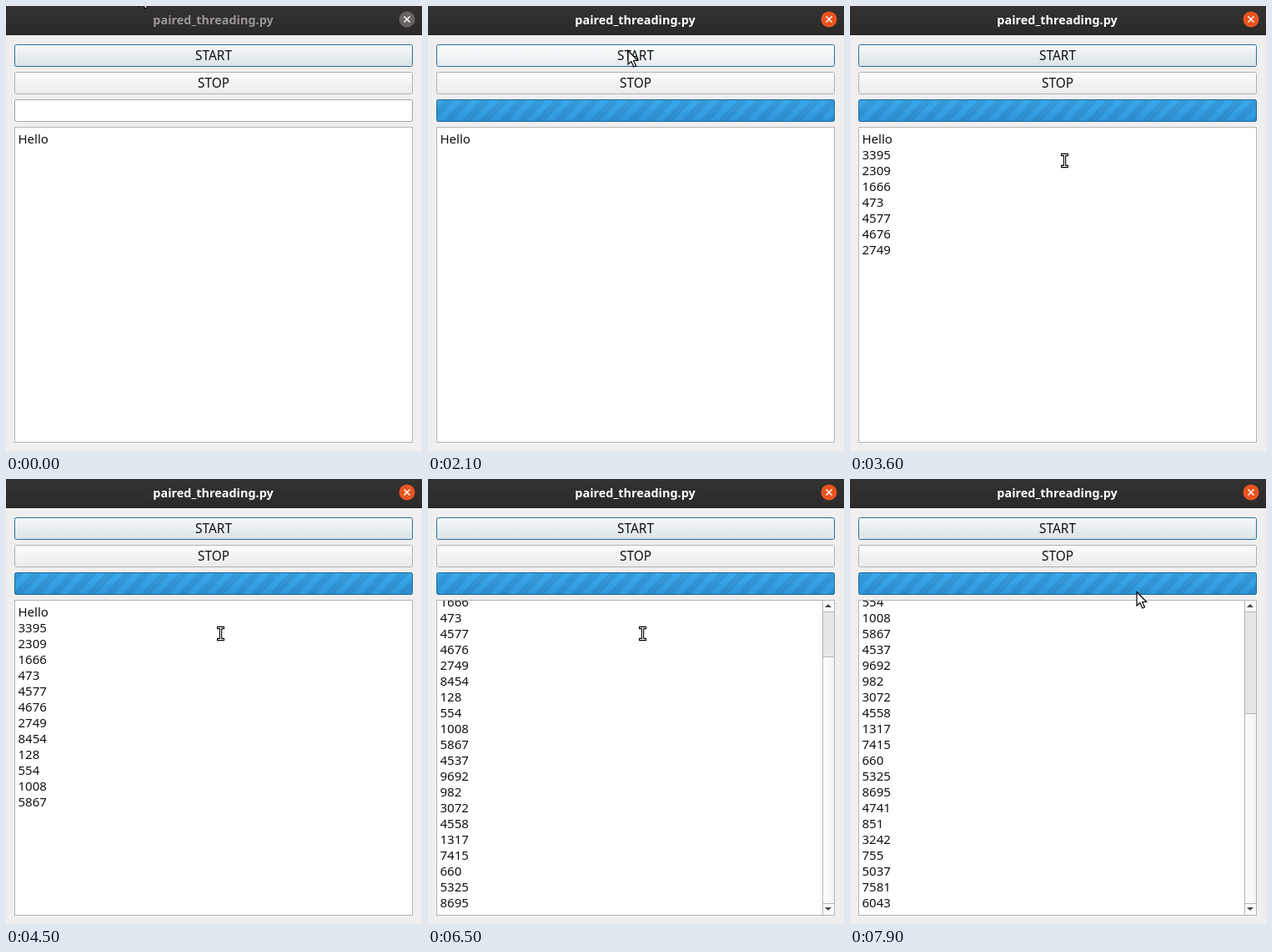
An HTML page for the animation above (8000 ms loop, 499 px wide and 534 px high).

```html
<!DOCTYPE html>
<html lang="en">
<head>
<meta charset="utf-8">
<style>
  html, body { margin: 0; width: 100%; height: 100%; overflow: hidden; background: #efefef; }
  svg { display: block; }
  text { font-family: "Noto Sans", "Open Sans", sans-serif; font-size: 15px; fill: #111; }
  .label { font-size: 15.4px; text-anchor: middle; }
  #title { font-size: 14.4px; font-weight: bold; text-anchor: middle; }
  .out { fill: none; stroke: #b4b4b4; }
</style>
</head>
<body>
<svg width="499" height="534" viewBox="0 0 499 534">
  <defs>
    <linearGradient id="bar" x2="0" y2="1"><stop stop-color="#353331"/><stop offset="1" stop-color="#2b2929"/></linearGradient>
    <linearGradient id="focus" x2="0" y2="1"><stop stop-color="#f5f9fa"/><stop offset="1" stop-color="#dae3e8"/></linearGradient>
    <linearGradient id="focusHover" x2="0" y2="1"><stop stop-color="#fdfefe"/><stop offset="1" stop-color="#e4ecef"/></linearGradient>
    <linearGradient id="plain" x2="0" y2="1"><stop stop-color="#fcfcfc"/><stop offset="1" stop-color="#ebebeb"/></linearGradient>
    <linearGradient id="plainHover" x2="0" y2="1"><stop stop-color="#fff"/><stop offset="1" stop-color="#f3f3f3"/></linearGradient>
    <linearGradient id="blue" x2="0" y2="1"><stop stop-color="#3ba8ec"/><stop offset="1" stop-color="#2f97db"/></linearGradient>
    <linearGradient id="thumbFill"><stop stop-color="#fdfdfd"/><stop offset="1" stop-color="#f3f3f3"/></linearGradient>
    <clipPath id="barClip"><rect x="11" y="113" width="476" height="25"/></clipPath>
    <clipPath id="logClip"><rect x="11" y="146" width="476" height="377"/></clipPath>
  </defs>

  <rect width="499" height="534" fill="#efefef"/>
  <rect width="499" height="35" fill="url(#bar)"/>
  <rect y="34" width="499" height="1" fill="#232121"/>
  <text id="title" x="248.5" y="22">paired_threading.py</text>
  <circle id="close" cx="481" cy="16" r="9.5"/>
  <path d="M477.5 12.5l7 7m0-7l-7 7" stroke="#fff" stroke-width="1.5"/>

  <rect id="start" x="10.5" y="46.5" width="477" height="26" rx="2" stroke="#2b6f9c"/>
  <text class="label" x="249" y="65">START</text>
  <rect id="stop" x="10.5" y="79.5" width="477" height="26" rx="2" stroke="#b1b1b1"/>
  <text class="label" x="249" y="98">STOP</text>

  <rect x="10.5" y="112.5" width="477" height="26" rx="2" fill="#fff" stroke="#a2a2a2"/>
  <g id="busy">
    <rect x="10.5" y="112.5" width="477" height="26" rx="2" fill="url(#blue)" stroke="#1f6699"/>
    <g clip-path="url(#barClip)"><path id="stripes" stroke="#000" stroke-opacity=".08" stroke-width="9"/></g>
  </g>

  <rect x="10.5" y="145.5" width="477" height="378" fill="#fff"/>
  <g clip-path="url(#logClip)"><g id="log"></g></g>
  <g id="scroll">
    <rect x="473.5" y="145.5" width="14" height="378" fill="#e6e6e6" stroke="#b4b4b4"/>
    <rect id="thumb" x="473.5" width="14" fill="url(#thumbFill)" stroke="#b4b4b4"/>
    <rect x="473.5" y="145.5" width="14" height="14" fill="#fafafa" stroke="#b4b4b4"/>
    <rect x="473.5" y="509.5" width="14" height="14" fill="#fafafa" stroke="#b4b4b4"/>
    <path d="M476 154h8l-4-4zM476 514h8l-4 4z" fill="#4a4a4a"/>
  </g>
  <rect class="out" x="10.5" y="145.5" width="477" height="378"/>

  <path id="arrow" d="M.5 .5v16.5l3.8-3.5 3 6.5 2.7-1.2-2.9-6.3h5z" fill="#fff" stroke="#000" stroke-width="1.2"/>
  <g id="beam" fill="none">
    <path d="M-4.5-7h9M-4.5 7h9M0-7v14" stroke="#000" stroke-width="3.4"/>
    <path d="M-3.5-7h7M-3.5 7h7M0-7v14" stroke="#fff" stroke-width="1.2"/>
  </g>
</svg>
<script>
const LOOP = 8000, TICK = 100, LINE = 19, VIEW = 376, TRACK = 350;
const ACTIVE = 2000, RUN = 2100, EVERY = 200;
const numbers = [3395, 2309, 1666, 473, 4577, 4676, 2749, 8454, 128, 554, 1008, 5867, 4537, 9692, 982,
  3072, 4558, 1317, 7415, 660, 5325, 8695, 4741, 851, 3242, 755, 5037, 7581, 6043];
// pointer path: time, x, y
const path = [[0, 159, -17.5], [100, 196, -16], [200, 196, -60], [500, 196, -60], [600, 196, -15],
  [1400, 239, 53], [2300, 239, 53], [2700, 241, 72], [2800, 242, 80], [3600, 257, 185],
  [6900, 257, 185], [7200, 274, 185], [7900, 343, 135], [8000, 343, 135]];

const $ = id => document.getElementById(id);
const set = (id, attrs) => { for (const k in attrs) $(id).setAttribute(k, attrs[k]); };
const show = (el, on) => el.style.display = on ? '' : 'none';

$('log').innerHTML = ['Hello', ...numbers].map((s, i) => `<text x="14.5" y="${165 + i * LINE}">${s}</text>`).join('');
const lines = [...$('log').children];

let stripes = '';
for (let x = -38; x < 500; x += 22) stripes += `M${x} 140l28-30`;
set('stripes', { d: stripes });

function pointer(t) {
  const i = path.findIndex(p => p[0] > t), [t0, x0, y0] = path[i - 1], [t1, x1, y1] = path[i];
  const k = (t - t0) / (t1 - t0);
  return [Math.round(x0 + (x1 - x0) * k), Math.round(y0 + (y1 - y0) * k)];
}

function draw(t) {
  const active = t >= ACTIVE, running = t >= RUN;
  set('title', { style: `fill:${active ? '#fff' : '#9a9896'}` });
  set('close', { fill: active ? '#e95420' : '#676462' });

  const [x, y] = pointer(t);
  set('start', { fill: y >= 46 && y < 74 ? 'url(#focusHover)' : 'url(#focus)' });
  set('stop', { fill: y >= 79 && y < 107 ? 'url(#plainHover)' : 'url(#plain)' });
  const inLog = y >= 146;
  show($('arrow'), !inLog);
  show($('beam'), inLog);
  set('arrow', { transform: `translate(${x + .5} ${y})` });
  set('beam', { transform: `translate(${x + .5} ${y + .5})` });

  show($('busy'), running);
  set('stripes', { transform: `translate(${Math.floor(t * .06) % 22} 0)` });

  const count = running ? Math.floor((t - RUN) / EVERY) : 0;
  const offset = Math.max(0, LINE * count - 349);
  lines.forEach((line, i) => show(line, i <= count));
  set('log', { transform: `translate(0 ${-offset})` });
  show($('scroll'), offset > 0);
  const size = Math.round(TRACK * VIEW / (VIEW + offset));
  set('thumb', { y: 509.5 - size, height: size });
}

function frame() {
  draw(Math.floor((performance.now() % LOOP + 1) / TICK) * TICK % LOOP);
  requestAnimationFrame(frame);
}
frame();
</script>
</body>
</html>
```
